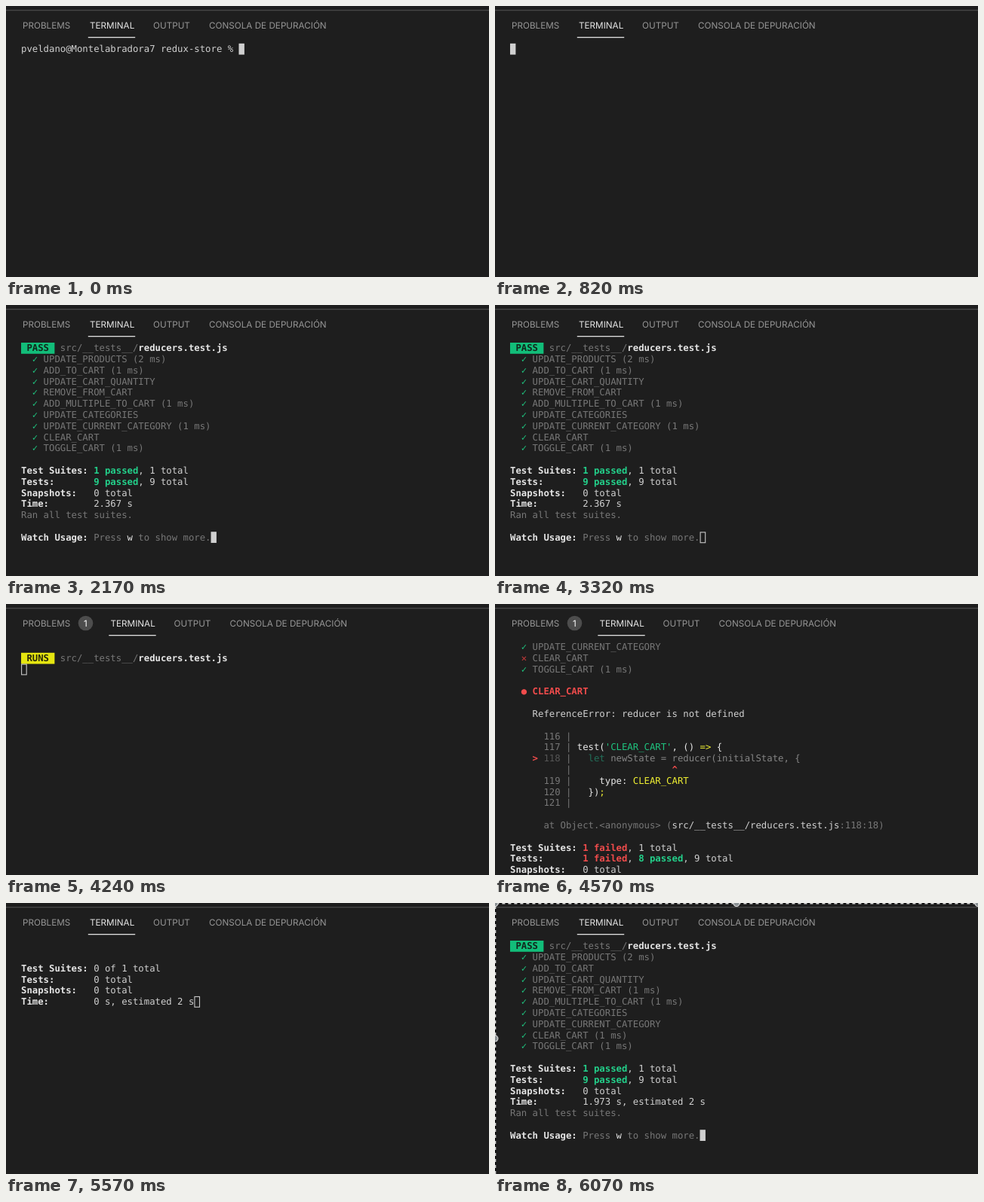
These frames come from a looping animation (640x360 px, 6320 ms). An HTML page with a canvas:

```html
<!DOCTYPE html>
<html lang="es">
<head>
<meta charset="utf-8">
<title>Terminal</title>
<style>
html, body { margin: 0; width: 100%; height: 100%; overflow: hidden; background: #1e1e1e; }
canvas { display: block; width: 640px; height: 360px; }
</style>
</head>
<body>
<canvas id="stage"></canvas>
<script>
const LOOP = 6320;
const LEFT = 20, TOP = 49.8, CELL = 7.397, LINE = 14.79;
const MONO = '12.29px "DejaVu Sans Mono", monospace';
const SANS = '11.7px Inter, sans-serif';

const canvas = document.getElementById('stage');
const ctx = canvas.getContext('2d');
const scale = window.devicePixelRatio || 1;
canvas.width = 640 * scale;
canvas.height = 360 * scale;

// Style keys used after "~" in a row: [colour, bold, background]
const STYLES = {
  n: ['#d0d0d0'],
  w: ['#e8e8e8'],
  b: ['#e5e5e5', true],
  d: ['#777777'],
  D: ['#858585'],
  k: ['#555555'],
  g: ['#1fc47f'],
  G: ['#23d18b', true],
  t: ['#23705a'],
  y: ['#f0f032'],
  r: ['#c93a3a'],
  R: ['#f14c4c', true],
  P: ['#12261c', true, '#12bd79'],
  F: ['#2a1010', true, '#cd3131'],
  Y: ['#26260a', true, '#e5e510']
};

const TESTS = ['UPDATE_PRODUCTS', 'ADD_TO_CART', 'UPDATE_CART_QUANTITY',
  'REMOVE_FROM_CART', 'ADD_MULTIPLE_TO_CART', 'UPDATE_CATEGORIES',
  'UPDATE_CURRENT_CATEGORY', 'CLEAR_CART', 'TOGGLE_CART'];

// One digit per test: its time in ms, 0 for none, x for a failure
const testRows = marks => TESTS.map((name, i) => {
  const m = marks[i];
  const sign = m === 'x' ? '~r✕' : '~g✓';
  return `~n  ${sign}~d ${name}${m > 0 ? ` (${m} ms)` : ''}`;
});

const summary = (suites, tests, time) => [
  `~bTest Suites: ${suites}`,
  `~bTests:       ${tests}`,
  '~bSnapshots:   ~n0 total',
  `~bTime:        ~n${time}`
];

const FILE = '~d src/__tests__/~breducers.test.js';
const RUNS = '~Y RUNS ' + FILE;
const ENDING = ['~dRan all test suites.', '', '~bWatch Usage:~d Press ~ww~d to show more.'];
const WAITING = ['~dDetermining test suites to run...'];

const passed = (marks, time) => [
  '~P PASS ' + FILE, ...testRows(marks), '',
  ...summary('~G1 passed~n, 1 total', '~G9 passed~n, 9 total', time), ...ENDING
];

const pending = time => summary('~n0 of 1 total', '~n0 total', time);

const failed = [
  '~F FAIL ' + FILE, ...testRows('2111110x1'), '',
  '~R  ● CLEAR_CART', '',
  '~n    ReferenceError: reducer is not defined', '',
  '~d      116 |',
  "~d      117 | ~wtest(~g'CLEAR_CART'~w, () ~y=>~w {",
  '~R    > ~k118 ~d| ~t  let ~DnewState = reducer(initialState, {',
  '~d          |~R                  ^',
  '~d      119 | ~w    type: ~yCLEAR_CART',
  '~d      120 | ~w  })~y;',
  '~d      121 |', '',
  '~d      at Object.<anonymous> (~nsrc/__tests__/reducers.test.js~d:118:18)', '',
  ...summary('~R1 failed~n, 1 total', '~R1 failed~n, ~G8 passed~n, 9 total', '1.412 s, estimated 3 s'),
  ...ENDING
];

const usage = [
  '~bNo tests found related to files changed since last commit.',
  '~dPress `a` to run all tests, or run Jest with `--watchAll`.', '',
  '~bWatch Usage',
  ...[['a', 'run all tests.'], ['f', 'run only failed tests.'], ['q', 'quit watch mode.'],
    ['p', 'filter by a filename regex pattern.'], ['t', 'filter by a test name regex pattern.'],
    ['Enter', 'trigger a test run.']].map(([key, what]) => `~d › Press ~w${key}~d to ${what}`),
  ''
];

const prompt = typed => '~npveldano@Montelabradora7 redux-store % ' + typed;
const command = prompt('npm run test');
const launch = [command, '', '~n> redux-store@0.1.0 test', '~n> react-scripts test', '', ''];
const first = passed('210010101', '2.367 s');
const last = passed('200110011', '1.973 s, estimated 2 s');
const estimate = '0 s, estimated 2 s';
const blur = { hollow: true };
const error = offset => ({ hollow: true, badge: true, offset });

// [start in ms, rows, options]; the cursor sits at the end of the last row
const SCENES = [
  [0, [prompt('')]],
  [70, [prompt('n')]],
  [150, [prompt('npm')]],
  [230, [prompt('npm r')]],
  [320, [prompt('npm run')]],
  [400, [prompt('npm run te')]],
  [480, [command]],
  [570, [command, '']],
  [650, launch],
  [820, ['']],
  [1150, WAITING],
  [1570, usage],
  [1650, WAITING],
  [1900, ['', '', ...pending('0 s')]],
  [1990, ['', RUNS, '', ...pending('1 s')]],
  [2170, first],
  [3240, first, blur],
  [3820, first, error(0)],
  [4240, ['', RUNS, ''], error(0)],
  [4320, failed, error(11)],
  [4570, failed, error(7)],
  [4820, failed, error(2)],
  [4900, failed, error(6)],
  [4990, failed, error(11)],
  [5320, failed, { hollow: true, offset: 11 }],
  [5570, ['', '', ...pending(estimate)], blur],
  [5660, ['', RUNS, '', ...pending(estimate)], blur],
  [5820, last, blur],
  [5990, last],
  [6070, last, { frame: true }]
];

function rect(x, y, w, h, color) {
  ctx.fillStyle = color;
  ctx.fillRect(x, y, w, h);
}

function disc(x, y, r, color) {
  ctx.fillStyle = color;
  ctx.beginPath();
  ctx.arc(x, y, r, 0, Math.PI * 2);
  ctx.fill();
}

function drawTabs(badge) {
  const shift = badge ? 27.5 : 0;
  const label = (text, x, color) => {
    ctx.fillStyle = color;
    ctx.fillText(text, x, 29.8);
  };
  rect(0, 5, 640, 1.3, '#474747');
  ctx.font = SANS;
  label('PROBLEMS', 22, '#979797');
  label('TERMINAL', 111 + shift, '#e7e7e7');
  label('OUTPUT', 195 + shift, '#979797');
  label('CONSOLA DE DEPURACIÓN', 269 + shift, '#979797');
  rect(108.8 + shift, 41, 62.4, 1.3, '#e0e0e0');
  if (badge) {
    disc(105.5, 25.5, 9.8, '#4d4d4d');
    ctx.textAlign = 'center';
    label('1', 105.4, '#ffffff');
    ctx.textAlign = 'left';
  }
}

// Draws one row on the character grid and returns its length in cells
function drawRow(row, y) {
  let col = 0;
  for (const part of row.split('~').slice(1)) {
    const [color, bold, back] = STYLES[part[0]];
    const text = part.slice(1);
    if (back) rect(LEFT + col * CELL, y + 0.2, text.length * CELL, LINE, back);
    ctx.font = (bold ? 'bold ' : '') + MONO;
    ctx.fillStyle = color;
    for (const ch of text) {
      if (ch !== ' ') ctx.fillText(ch, LEFT + col * CELL, y + 11.5);
      col++;
    }
  }
  return col;
}

function drawCursor(col, y, hollow) {
  const x = LEFT + col * CELL;
  if (hollow) {
    ctx.strokeStyle = '#c8c8c8';
    ctx.lineWidth = 1.1;
    ctx.strokeRect(x + 0.6, y + 0.7, CELL - 0.8, LINE - 1);
  } else {
    rect(x, y, CELL, LINE, '#d0d0d0');
  }
}

function drawSelection() {
  ctx.lineWidth = 1.5;
  for (const [color, dash] of [['#101010', []], ['#d8d8d8', [4, 4]]]) {
    ctx.strokeStyle = color;
    ctx.setLineDash(dash);
    ctx.beginPath();
    ctx.moveTo(0.6, 360);
    ctx.lineTo(0.6, 0.8);
    ctx.lineTo(640, 0.8);
    ctx.stroke();
  }
  ctx.setLineDash([]);
  for (const [x, y] of [[0, 0.5], [320, 0.5], [640, 0.5], [0, 180]]) {
    disc(x, y, 4.5, '#e0e0e0');
    disc(x, y, 3.4, '#8c9295');
  }
}

function draw(now) {
  const t = now % LOOP;
  const [, rows, opts = {}] = SCENES.findLast(scene => scene[0] <= t);
  const { hollow, badge, frame, offset = 0 } = opts;
  ctx.setTransform(scale, 0, 0, scale, 0, 0);
  ctx.textRendering = 'geometricPrecision';
  rect(0, 0, 640, 360, '#1e1e1e');
  drawTabs(badge);
  rows.slice(offset, offset + 21).forEach((row, i) => {
    const y = TOP + i * LINE;
    const end = drawRow(row, y);
    if (i + offset === rows.length - 1) drawCursor(end, y, hollow);
  });
  if (frame) drawSelection();
}

const start = performance.now();
function tick() {
  draw(performance.now() - start);
  requestAnimationFrame(tick);
}
tick();
</script>
</body>
</html>
```
